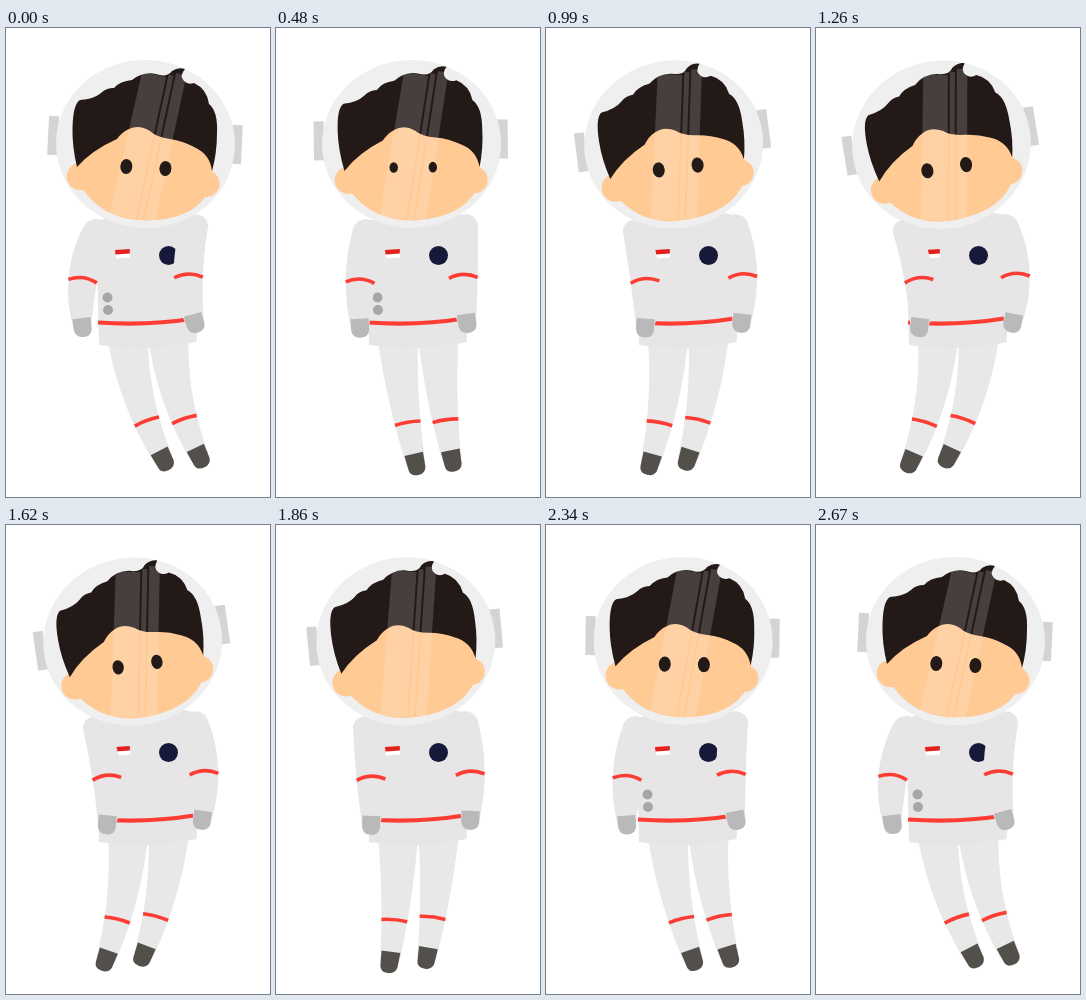
An HTML page that plays this animation: 264x469 px, repeating every 2.7 s.

```html
<!DOCTYPE html>
<html lang="en">
<head>
<meta charset="utf-8">
<title>Floating astronaut</title>
<style>
  html, body { margin: 0; width: 100%; height: 100%; overflow: hidden; background: #fff; }
  svg { display: block; width: 100vw; height: 100vh; }
  .arm, .torso { fill: #e7e5e6; }
  .leg { fill: #e8e8e8; }
  .boot { fill: #53504c; }
  .hand { fill: #b9b9b9; }
  .button { fill: #a6a6a6; }
  .band { fill: none; stroke: #fd3d33; stroke-width: 3.6; }
  .skin { fill: #ffca94; }
  .dark { fill: #231a17; }
  .shine { fill: #fff; opacity: .16; }
</style>
</head>
<body>
<svg viewBox="0 0 264 469">
  <g id="legs"></g>
  <path class="torso" d="M84 198Q110 182 140 184Q180 180 198 193L190.500 314Q140 325 93 317L91 230Z"/>
  <path class="band" d="M92 294.500Q142 298 188 290.500" style="stroke-width:4.200"/>
  <path fill="#fff" d="M109.500 226L124 225V229.500L110 230.500Z"/>
  <path fill="#e3201b" d="M109 222L123.800 221V225.500L109.500 226.500Z"/>
  <circle cx="162.500" cy="227.500" r="9.500" fill="#17193a"/>
  <circle class="button" cx="101.500" cy="269.500" r="5"/>
  <circle class="button" cx="102" cy="282" r="5"/>
  <g id="arms"></g>
  <g id="head">
    <g fill="#d4d4d5" transform="rotate(2.800 139 112)">
      <rect x="42" y="92.500" width="10" height="39"/>
      <rect x="226" y="92.500" width="10" height="39"/>
    </g>
    <ellipse cx="139.500" cy="116" rx="89.500" ry="84" fill="#efeff0" transform="rotate(2.800 139.500 116)"/>
    <circle class="skin" cx="74.500" cy="148.500" r="13.800"/>
    <circle class="skin" cx="200" cy="155.500" r="13.500"/>
    <path class="skin" d="M71 137L100 95H170L208 135L202 165Q186 192 141 192.500Q98 193 76 160Z"/>
    <path class="dark" d="M71 139Q66 118 66.500 100Q67 76 74 72Q88 71 95 65Q100 60 108 60
      Q114 53 126 52Q137 43 150 46Q161 50 166 43Q172 39 179 41Q173 48 178 53Q182 57 188 55
      Q201 61 203 76Q212 83 211 105Q211 125 206 143Q204 126 188 119Q177 113 164 111
      Q150 109 144 103Q133 96 123 101Q116 104 111 111Q86 122 71 139Z"/>
    <g class="shine" transform="rotate(12.100 136 183)">
      <path d="M107 47H131.500V192.500H105Z"/>
      <path d="M133.500 44H138.500V192.500H133.500Z"/>
      <path d="M140.500 41H151V191H140.500Z"/>
    </g>
    <ellipse class="eye dark" rx="6" ry="7.600"/>
    <ellipse class="eye dark" rx="6" ry="7.600"/>
  </g>
</svg>
<script>
const LOOP = 2700, STEP = 30;
const BLINKS = [670, 1875], BLINK_HALF = 300;
const HEAD_TURN = 12.1;
const BOOT = 'M-9.5 -10H9.5L8.6 5Q7 11.5 0 11.5Q-8 11.5 -8.6 5Z';
const HAND = 'M-9 -9H9V3Q8 10 0 10Q-8 10 -9 2Z';

// Half widths run from top to end with a bulge between; bandAt is a share of the length.
const LEG = { group: 'legs', kind: 'leg', top: 20, end: 9.5, bulge: 0,
              tip: BOOT, tipKind: 'boot', bandAt: 0.67, bandLift: 2 };
const ARM = { group: 'arms', kind: 'arm', top: 13, end: 9, bulge: 3.5,
              tip: HAND, tipKind: 'hand', bandAt: 0.535, bandLift: 7 };

// Angles in radians: tilt at rest, swing at the joint, extra curl towards the end.
const limbs = [
  { ...LEG, x: 122, y: 312, length: 125, tilt: 0.03, swing: 0.07, curl: 0.38 },
  { ...LEG, x: 162.5, y: 312, length: 121, tilt: 0, swing: 0.07, curl: 0.38 },
  { ...ARM, x: 90, y: 203, length: 97, tilt: 0, swing: -0.4, curl: 0.52 },
  { ...ARM, x: 189, y: 198, length: 97, tilt: 0.04, swing: -0.31, curl: 0.54 }
];

const $ = id => document.getElementById(id);

function addPath(group, kind, d = '') {
  const el = document.createElementNS('http://www.w3.org/2000/svg', 'path');
  el.setAttribute('class', kind);
  el.setAttribute('d', d);
  return $(group).appendChild(el);
}

for (const limb of limbs) {
  limb.body = addPath(limb.group, limb.kind);
  limb.tipEl = addPath(limb.group, limb.tipKind, limb.tip);
  limb.band = addPath(limb.group, 'band');
}

function drawLimb(limb, sway) {
  const { x, y, length, tilt, swing, curl, top, end, bulge, bandAt, bandLift } = limb;
  const angle = u => tilt + sway * (swing + curl * u);
  const half = u => top + (end - top) * u + bulge * 4 * u * (1 - u);

  // Point on the bent limb: u along it, side across it, lift back up it.
  const at = (u, side = 0, lift = 0) => {
    const chord = angle(u / 2), a = angle(u), d = length * u;
    return [
      x + d * Math.sin(chord) + side * Math.cos(a) - lift * Math.sin(a),
      y + d * Math.cos(chord) - side * Math.sin(a) - lift * Math.cos(a)
    ];
  };

  const left = [], right = [];
  for (let i = 0; i <= 16; i++) {
    const u = i / 16;
    left.push(at(u, -half(u)));
    right.unshift(at(u, half(u)));
  }
  limb.body.setAttribute('d',
    `M${[...left, ...right].join('L')}A${top} ${top * 0.9} 0 0 0 ${left[0]}Z`);

  const w = half(bandAt);
  limb.band.setAttribute('d',
    `M${at(bandAt, -w)}Q${at(bandAt, 0, bandLift)} ${at(bandAt, w)}`);

  const turn = -angle(1) * 180 / Math.PI;
  limb.tipEl.setAttribute('transform', `translate(${at(1)}) rotate(${turn})`);
}

function eyeSize(t) {
  const gap = Math.min(BLINK_HALF, ...BLINKS.map(b => Math.abs(t - b)));
  return (1 - Math.cos(Math.PI * gap / BLINK_HALF)) / 2;
}

const eyes = document.querySelectorAll('.eye');

function draw(t) {
  const sway = Math.cos(2 * Math.PI * t / LOOP);
  limbs.forEach(limb => drawLimb(limb, sway));
  $('head').setAttribute('transform', `rotate(${HEAD_TURN * (sway - 1) / 2} 136 183)`);
  eyes.forEach((eye, i) => eye.setAttribute('transform',
    `translate(${120.3 + 39.1 * i} ${138.5 + 2 * i}) rotate(2.8) scale(${eyeSize(t)})`));
}

const start = performance.now();
function tick() {
  const t = (performance.now() - start) % LOOP;
  draw(Math.floor(t / STEP) * STEP);
  requestAnimationFrame(tick);
}
draw(0);
requestAnimationFrame(tick);
</script>
</body>
</html>
```
